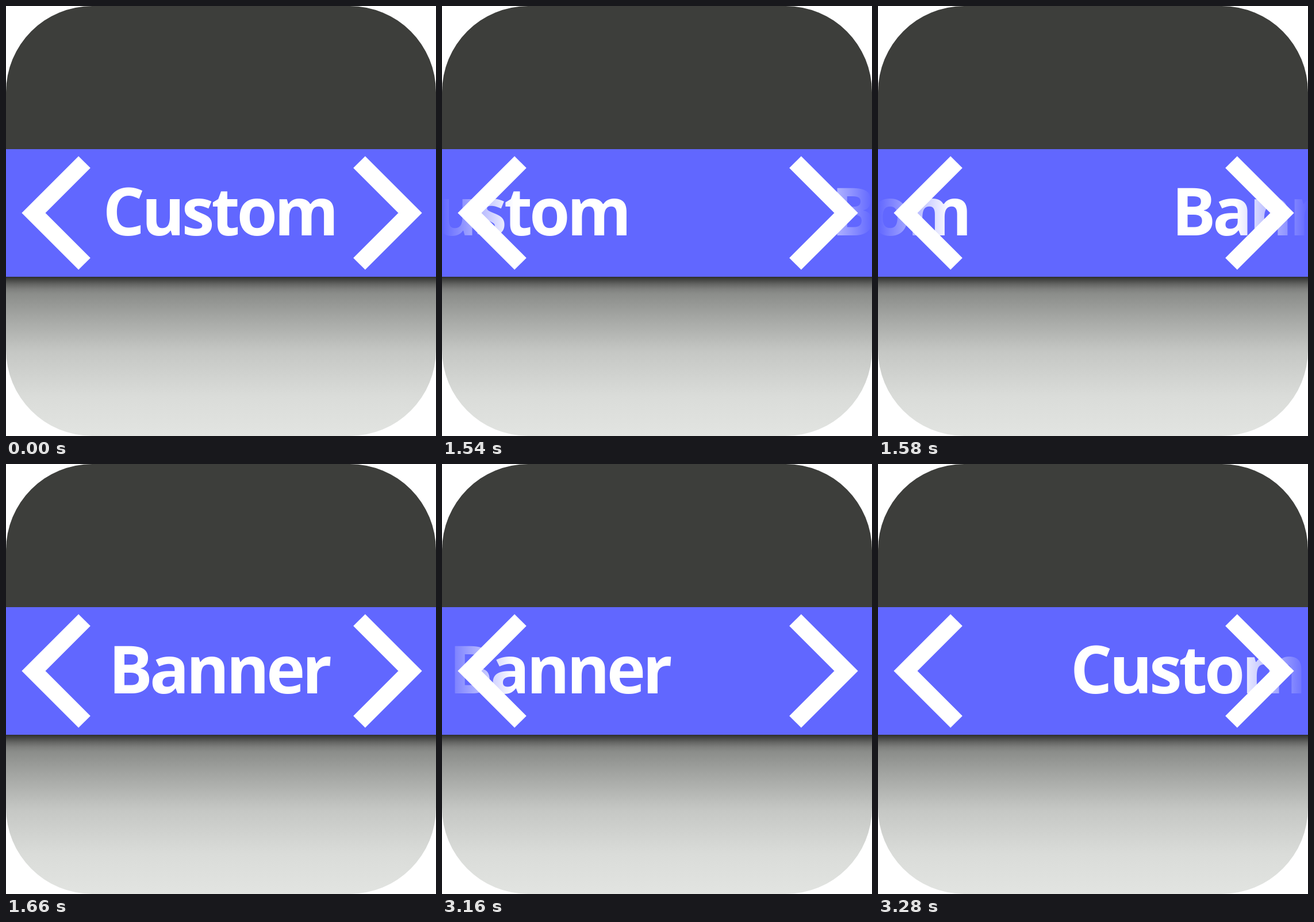
These frames come from a looping animation (748 by 748 pixels, 3320 ms). An HTML page:

```html
<!DOCTYPE html>
<html lang="en">
<head>
<meta charset="utf-8">
<title>Sliding banner</title>
<style>
  html, body { margin: 0; width: 100%; height: 100%; overflow: hidden; background: #fff; }
  svg { display: block; width: 100vw; height: 100vh; }
  text { font: 700 114px "Open Sans", "Noto Sans", sans-serif; letter-spacing: -5.2px; fill: #fff; }
  .arrow { fill: none; stroke: #fff; stroke-width: 29.2; }
</style>
</head>
<body>
<svg viewBox="0 0 748 748">
  <defs>
    <linearGradient id="floor" gradientUnits="userSpaceOnUse" x1="0" y1="470" x2="0" y2="748">
      <stop offset="0" stop-color="#292a28"/>
      <stop offset=".025" stop-color="#474846"/>
      <stop offset=".05" stop-color="#646563"/>
      <stop offset=".08" stop-color="#7e7f7d"/>
      <stop offset=".11" stop-color="#8b8d8a"/>
      <stop offset=".25" stop-color="#a3a5a2"/>
      <stop offset=".47" stop-color="#c5c7c4"/>
      <stop offset=".75" stop-color="#dadcd9"/>
      <stop offset="1" stop-color="#e2e4e1"/>
    </linearGradient>
    <linearGradient id="fade">
      <stop offset="0" stop-color="#6167ff"/>
      <stop offset=".1667" stop-color="#6167ff" stop-opacity="0"/>
      <stop offset=".8333" stop-color="#6167ff" stop-opacity="0"/>
      <stop offset="1" stop-color="#6167ff"/>
    </linearGradient>
    <clipPath id="tile"><rect width="748" height="748" rx="150"/></clipPath>
  </defs>
  <g clip-path="url(#tile)">
    <rect width="748" height="250" fill="#3d3e3b"/>
    <rect y="470" width="748" height="278" fill="url(#floor)"/>
  </g>
  <rect y="249" width="748" height="222" fill="#6167ff"/>
  <text id="custom" x="168.5" y="398.5">Custom</text>
  <text id="banner" x="178.5" y="398.5">Banner</text>
  <rect y="249" width="748" height="222" fill="url(#fade)"/>
  <path class="arrow" d="M136.5 271.5L48 360l88.5 88.5"/>
  <path class="arrow" d="M614.5 271.5L703 360l-88.5 88.5"/>
</svg>
<script>
  const WIDTH = 748, LOOP = 3320, STEP = 40;
  // Each slide starts at a set time and moves in hard steps, in ninths of the width.
  const slides = [
    { start: 1500, out: "custom", into: "banner", ninths: [1, 3, 5, 7, 9] },
    { start: 3160, out: "banner", into: "custom", ninths: [2, 4, 5, 7] }
  ];

  function place(id, x) {
    document.getElementById(id).setAttribute("transform", `translate(${x} 0)`);
  }

  function draw() {
    const time = performance.now() % LOOP;
    const slide = slides.findLast(s => time >= s.start);
    if (slide) {
      const step = Math.floor((time - slide.start) / STEP);
      const shift = WIDTH * (slide.ninths[step] ?? 9) / 9;
      place(slide.out, -shift);
      place(slide.into, WIDTH - shift);
    } else {
      place("custom", 0);
      place("banner", WIDTH);
    }
    requestAnimationFrame(draw);
  }
  draw();
</script>
</body>
</html>
```
